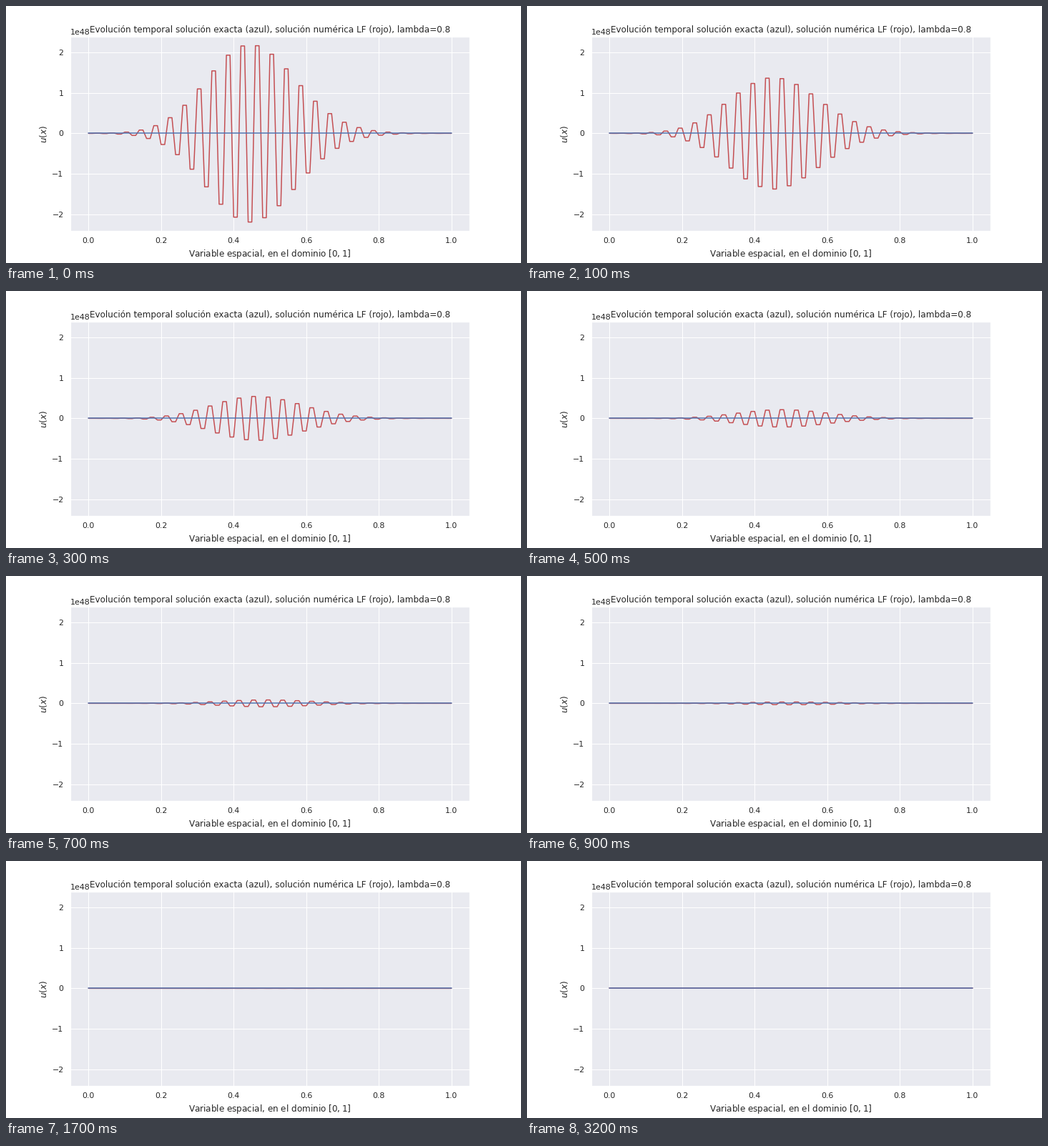
Animation of 720x360 px, one loop 8000 ms. Source, as a matplotlib script:

```python
import numpy as np
import matplotlib.pyplot as plt
from matplotlib.animation import FuncAnimation

FRAMES, INTERVAL = 80, 100
INK = "#262626"
RED, BLUE = "#c44e52", "#4c72b0"

plt.rcParams.update({
    "font.family": "DejaVu Sans",
    "text.color": INK,
    "axes.labelcolor": INK,
    "axes.facecolor": "#e9eaf0",
    "axes.edgecolor": "white",
    "axes.linewidth": 1.25,
    "axes.axisbelow": True,
    "axes.grid": True,
    "axes.labelsize": 12,
    "axes.titlesize": 12,
    "axes.titley": 1.0,  # keep the title level with the axis multiplier
    "grid.color": "white",
    "grid.linewidth": 1,
    "lines.linewidth": 1.5,
    "lines.solid_capstyle": "round",
    "xtick.color": INK,
    "ytick.color": INK,
    "xtick.labelsize": 11,
    "ytick.labelsize": 11,
    "xtick.major.size": 6,
    "ytick.major.size": 6,
    "xtick.bottom": False,
    "ytick.left": False,
})

node = np.arange(101)
x = node / 100


def numeric(step):
    """Decaying wave packet: pairs of equal nodes with alternating sign."""
    pair = (node - 42 - step) // 2
    center = (42.5 + step + 2 * pair) / 100
    d = center - (0.446 + 0.006 * step)
    envelope = np.exp(-33.4 * d**2 + 9.5 * d**3)
    sign = 1 - 2 * (pair % 2)
    return 2.19e48 * 0.628**step * sign * envelope


fig, ax = plt.subplots(figsize=(10, 5), dpi=72)
fig.subplots_adjust(left=0.125, right=0.9, bottom=0.125, top=0.88)
ax.set_xlim(-0.05, 1.05)
ax.set_ylim(-2.408e48, 2.383e48)
ax.set_title("Evolución temporal solución exacta (azul), "
             "solución numérica LF (rojo), lambda=0.8")
ax.set_xlabel("Variable espacial, en el dominio $[0,1]$")
ax.set_ylabel("$u(x)$")

numeric_line, = ax.plot(x, numeric(0), color=RED)
ax.plot(x, np.zeros_like(x), color=BLUE)


def update(step):
    numeric_line.set_ydata(numeric(step))
    return numeric_line,


anim = FuncAnimation(fig, update, frames=FRAMES, interval=INTERVAL,
                     repeat=True, repeat_delay=0)
plt.show()
```
